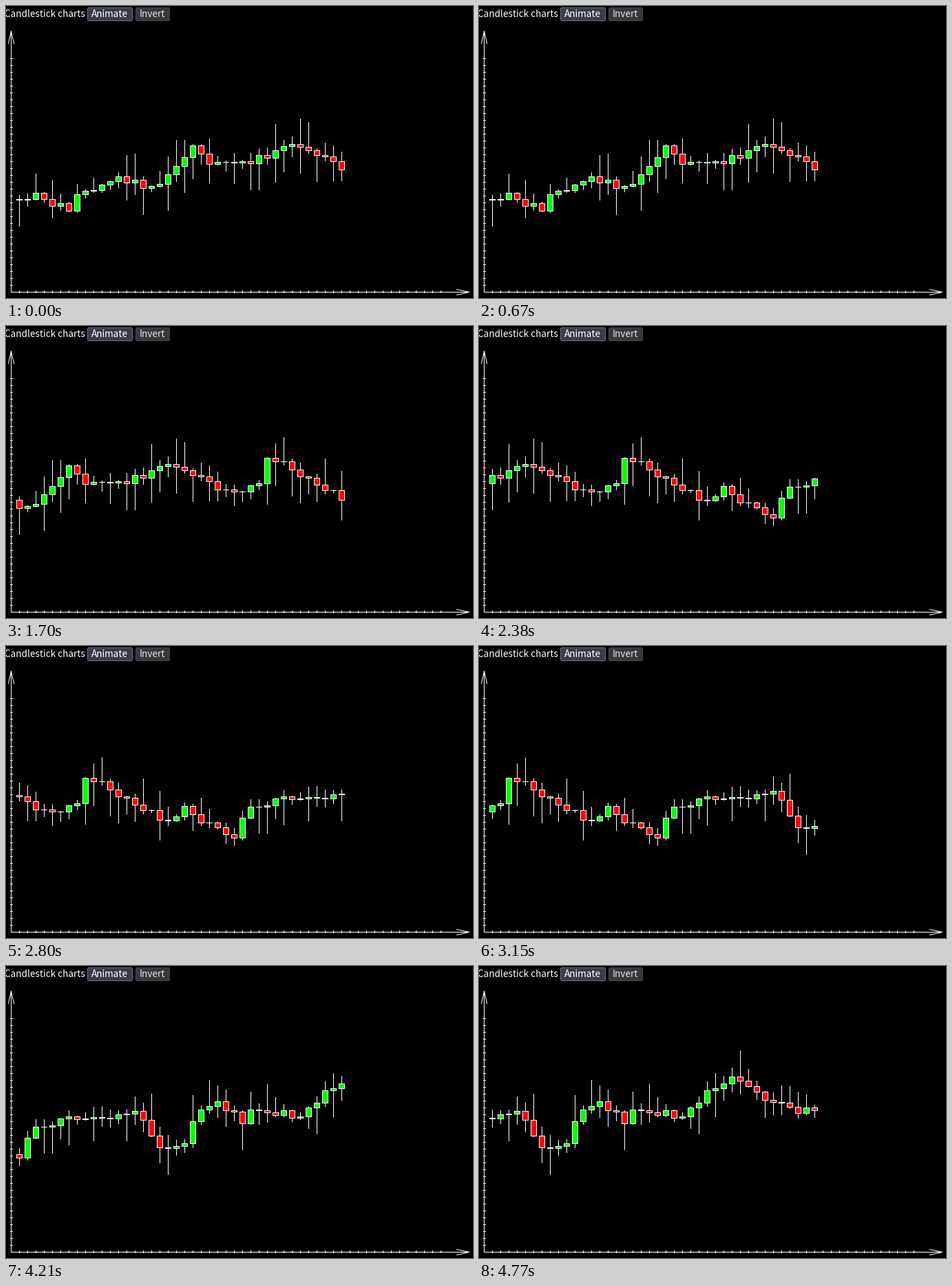
Recreate the animation shown at these times as a matplotlib script. Size 678x425 px, loop 4840 ms.

```python
import matplotlib.pyplot as plt
import numpy as np
from matplotlib.animation import FuncAnimation
from matplotlib.collections import PolyCollection
from matplotlib.patches import FancyBboxPatch

W, H, DPI = 678, 425, 100
LOOP, STEP = 4840, 20
VISIBLE, PITCH, FIRST_X = 40, 12, 19
COUNT = VISIBLE + 74
WHITE, GREEN, RED = "#ffffff", "#00ff00", "#ff0000"

# Scrolling: one candle every PERIOD ms, seen only when the view is redrawn.
START, PERIOD = 863.25, 52.3
REDRAWS = np.concatenate(
    [np.arange(940, 1151, 70), np.arange(1280, 1421, 70)]
    + [s + 70 * np.arange(8) for s in (1480, 2030, 2590, 3150, 3720, 4280)])

# Turning points of the price: (candle, level in pixels from the top).
TURNS = [(0, 282), (2, 272), (6, 298), (7, 274), (11, 255), (17, 259),
         (21, 203), (23, 230), (28, 229), (33, 201), (41, 241), (44, 229),
         (45, 192), (55, 254), (57, 233), (63, 279), (65, 234), (77, 211),
         (80, 264), (83, 258), (84, 226), (87, 197), (90, 229), (91, 209),
         (97, 219), (103, 161), (108, 198), (113, 210)]


def make_prices():
    """Each candle opens at the last close; jitter fills in between turns."""
    rng = np.random.default_rng(12)
    turns, levels = np.transpose(TURNS)
    jitter = rng.normal(0, 4, COUNT)
    jitter[turns] = 0
    closes = np.rint(np.interp(np.arange(COUNT), turns, levels) + jitter)
    opens = np.r_[closes[0] - 1, closes[:-1]]
    up, down = (np.rint(rng.exponential(m, COUNT).clip(1, 38)) for m in (14, 16))
    highs = np.minimum(opens, closes) - up
    lows = np.maximum(opens, closes) + down
    return opens, closes, highs, lows


OPENS, CLOSES, HIGHS, LOWS = make_prices()


def shift_at(t):
    past = REDRAWS[REDRAWS <= t]
    return int((past[-1] - START) / PERIOD) if len(past) else 0


def box(x0, y0, x1, y1):
    """Rectangle over whole pixels, both ends included."""
    return [(x0, y0), (x1 + 1, y0), (x1 + 1, y1 + 1), (x0, y1 + 1)]


fig = plt.figure(figsize=(W / DPI, H / DPI), dpi=DPI, facecolor="black")
ax = fig.add_axes([0, 0, 1, 1])
ax.set_xlim(0, W)
ax.set_ylim(H, 0)
ax.axis("off")


def label(x, text, color):
    ax.text(x, 16, text, color=color, fontsize=13.6 * 72 / DPI, va="baseline",
            family=["Noto Sans CJK JP", "DejaVu Sans"])


def button(x0, x1, text, fill, edge, color):
    ax.add_patch(FancyBboxPatch(
        (x0 + 0.5, 2.5), x1 - x0 - 1, 19, boxstyle="round,pad=0,rounding_size=2",
        facecolor=fill, edgecolor=edge, linewidth=0.72))
    label(x0 + 6, text, color)


def draw_axes():
    marks = [box(7, 36, 7, 416), box(7, 416, 672, 416)]
    marks += [box(6, y, 9, y) for y in range(76, 407, 10)]
    marks += [box(x, 414, x, 417) for x in range(FIRST_X, 632, PITCH)]
    ax.add_collection(PolyCollection(marks, facecolors=WHITE, linewidths=0,
                                     antialiaseds=False))
    for xs, ys in (([3, 7, 11], [54, 36, 54]), ([654, 672, 654], [412, 416, 420])):
        ax.plot(np.add(xs, 0.5), np.add(ys, 0.5), color=WHITE, lw=0.72)


label(-2, "Candlestick charts", "#ffffff")
button(118, 184, "Animate", "#3b3d48", "#66758c", "#ffffff")
button(188, 238, "Invert", "#38383f", "#45454d", "#e0e0e0")
draw_axes()
candles = PolyCollection([], linewidths=0, antialiaseds=False)
ax.add_collection(candles)


def draw(i):
    first = shift_at((i + 0.5) * STEP)
    shapes, colors = [], []
    for j in range(VISIBLE):
        k, x = first + j, FIRST_X + PITCH * j
        top, bottom = sorted((OPENS[k], CLOSES[k]))
        shapes += [box(x, HIGHS[k], x, LOWS[k]), box(x - 4, top, x + 4, bottom)]
        colors += [WHITE, WHITE]
        if bottom - top > 1:
            shapes.append(box(x - 3, top + 1, x + 3, bottom - 1))
            colors.append(GREEN if CLOSES[k] < OPENS[k] else RED)
    candles.set_verts(shapes)
    candles.set_facecolor(colors)
    return [candles]


anim = FuncAnimation(fig, draw, frames=LOOP // STEP, interval=STEP,
                     repeat=True, repeat_delay=0, blit=False)
plt.show()
```
